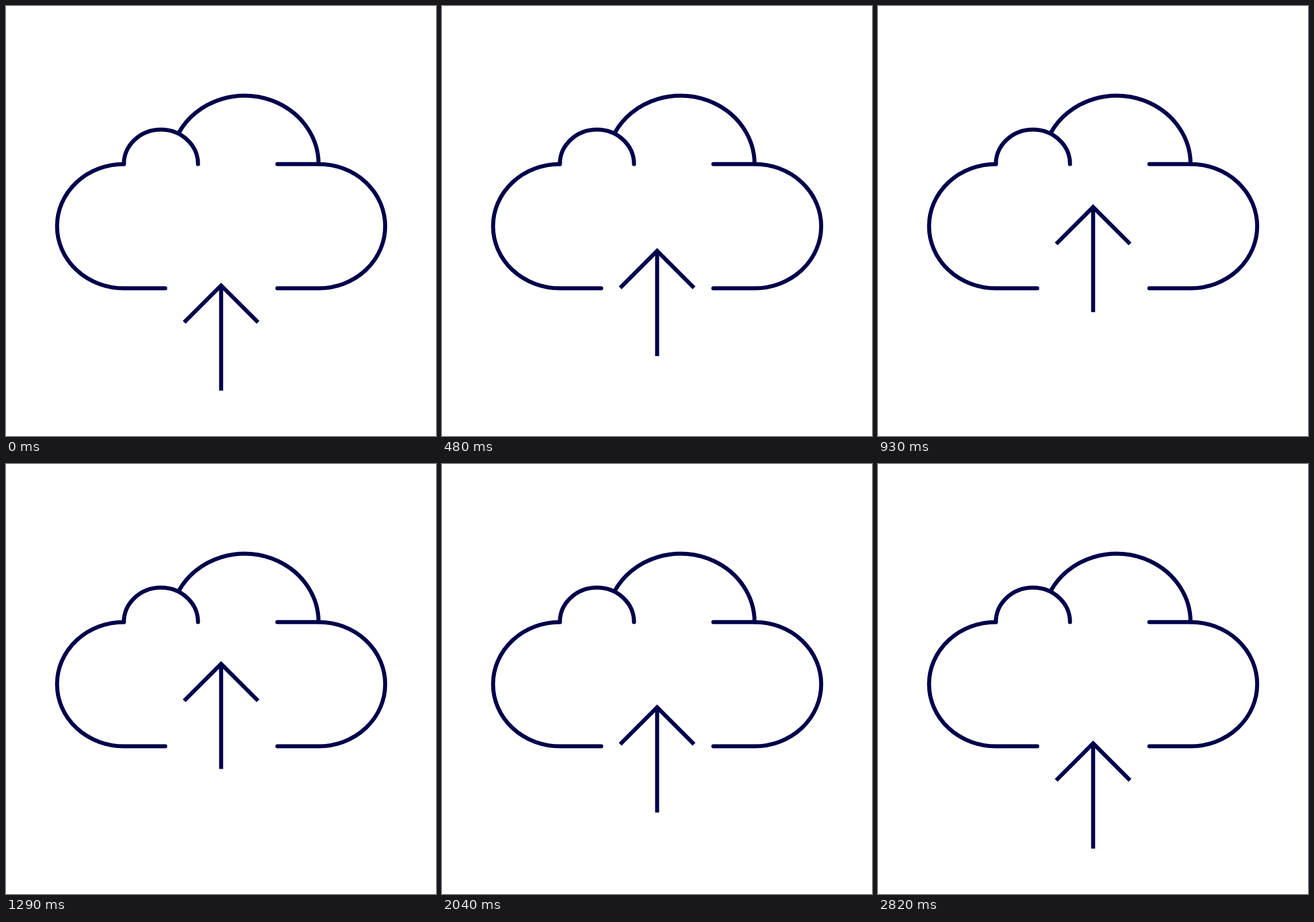
An HTML page with a canvas for the animation above (2.85 s loop, 748 px wide and 748 px high).

```html
<!DOCTYPE html>
<html lang="en">
<head>
<meta charset="utf-8">
<title>Cloud upload</title>
<style>
  html, body { margin: 0; width: 100%; height: 100%; overflow: hidden; background: #fff; }
  canvas { display: block; width: 748px; height: 748px; }
</style>
</head>
<body>
<canvas id="stage" width="748" height="748"></canvas>
<script>
const ctx = document.getElementById('stage').getContext('2d');
const SIZE = 748, LOOP = 2850, STEP = 30, PEAK = 1080, RISE = 144;
const MID = 374.2, TIP = 486.1, ARM = 64.2, FOOT = 669;
const TOP = 275, BOTTOM = 491, CENTER = 383;

const smooth = p => p * p * (3 - 2 * p);

function lift(t) {
  return RISE * (t < PEAK ? smooth(t / PEAK) : 1 - smooth((t - PEAK) / (LOOP - PEAK)));
}

function stroke(path) {
  ctx.beginPath();
  path();
  ctx.stroke();
}

function drawCloud() {
  ctx.lineCap = ctx.lineJoin = 'round';
  // left side
  stroke(() => {
    ctx.moveTo(277, BOTTOM);
    ctx.lineTo(205, BOTTOM);
    ctx.ellipse(205, CENTER, 116.2, 108, 0, Math.PI / 2, Math.PI * 1.5);
  });
  // right side
  stroke(() => {
    ctx.moveTo(472, TOP);
    ctx.lineTo(544, TOP);
    ctx.ellipse(544, CENTER, 115.6, 108, 0, -Math.PI / 2, Math.PI / 2);
    ctx.lineTo(472, BOTTOM);
  });
  // small and large humps
  stroke(() => ctx.ellipse(269.5, TOP, 64.5, 60, 0, Math.PI, Math.PI * 2));
  stroke(() => ctx.ellipse(415, TOP, 128.7, 119, 0, Math.PI * 1.15, Math.PI * 2));
}

function drawArrow(y) {
  ctx.lineCap = 'butt';
  ctx.lineJoin = 'miter';
  stroke(() => {
    ctx.moveTo(MID - ARM, TIP + ARM - y);
    ctx.lineTo(MID, TIP - y);
    ctx.lineTo(MID + ARM, TIP + ARM - y);
  });
  stroke(() => {
    ctx.moveTo(MID, TIP - y);
    ctx.lineTo(MID, FOOT - y);
  });
}

function render(now) {
  const t = Math.floor((now % LOOP) / STEP) * STEP;
  ctx.fillStyle = '#fff';
  ctx.fillRect(0, 0, SIZE, SIZE);
  ctx.strokeStyle = '#00004b';
  ctx.lineWidth = 7;
  drawCloud();
  drawArrow(lift(t));
}

const start = performance.now();
function tick() {
  render(performance.now() - start);
  requestAnimationFrame(tick);
}
tick();
</script>
</body>
</html>
```
